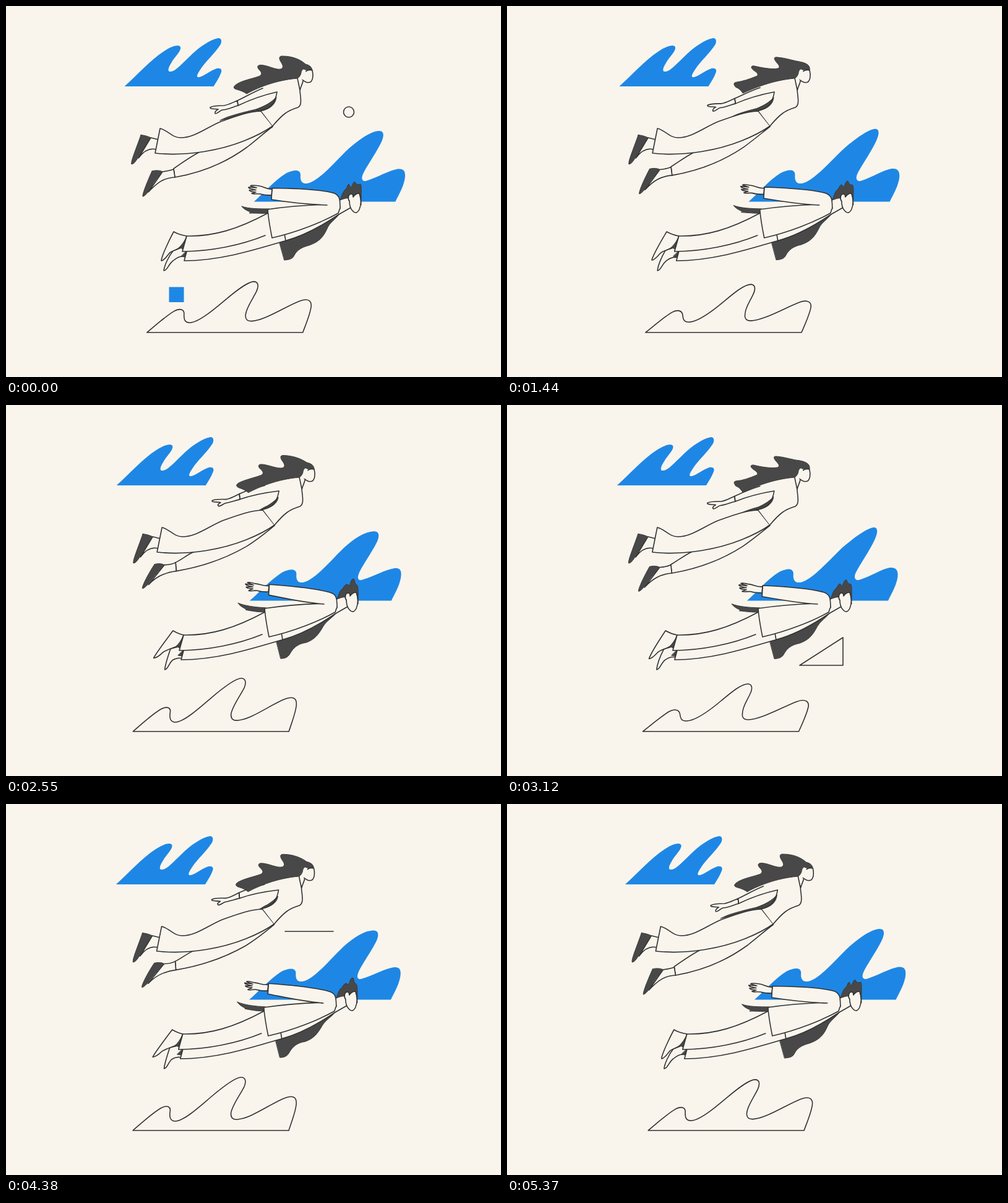
These frames come from a looping animation (800 by 600 pixels, 5.4 s). An HTML page:

```html
<!DOCTYPE html>
<html lang="en">
<head>
<meta charset="utf-8">
<title>Flying</title>
<style>
  html, body { margin: 0; width: 100%; height: 100%; overflow: hidden; background: #f9f5ed; }
  svg { display: block; width: 100vw; height: 100vh; }
  path, circle { stroke-linejoin: round; stroke-linecap: round; }
  .blue { fill: #1e87e5; }
  .dark { fill: #484848; stroke: #3a3a3a; stroke-width: 1; }
  .skin { fill: #f9f5ed; }
  .line { fill: none; stroke: #323232; stroke-width: 1.6; }
  .both { fill: #f9f5ed; stroke: #323232; stroke-width: 1.6; }
</style>
</head>
<body>
<svg viewBox="0 0 800 600"></svg>
<script>
const LOOP = 5400, CYCLE = 1800, STEP = 30;
const svg = document.querySelector('svg');
const parts = [];

function add(parent, tag, cls) {
  const node = document.createElementNS('http://www.w3.org/2000/svg', tag);
  if (cls) node.setAttribute('class', cls);
  parent.appendChild(node);
  return node;
}

// A part is a path; with a second pose it is blended by the named driver.
function part(group, cls, d, to, driver) {
  const node = add(group, 'path', cls);
  node.setAttribute('d', d);
  if (to) parts.push({ node, d, to, driver });
}

const NUM = /-?\d+(\.\d+)?/g;
function blend(a, b, k) {
  const ends = b.match(NUM);
  let i = 0;
  return a.replace(NUM, v => (+v + (ends[i++] - v) * k).toFixed(2));
}

// Value at time t along [time, value] keys.
function track(t, keys, ease = k => k) {
  if (t <= keys[0][0]) return keys[0][1];
  for (let i = 1; i < keys.length; i++) {
    const [t0, v0] = keys[i - 1], [t1, v1] = keys[i];
    if (t <= t1) return v0 + (v1 - v0) * ease((t - t0) / (t1 - t0));
  }
  return keys[keys.length - 1][1];
}
const soft = k => (1 - Math.cos(Math.PI * k)) / 2;
const wave = (t, peak = 0, period = CYCLE) => Math.cos((t - peak) / period * 2 * Math.PI);

const [topCloud, woman, bigCloud, man, lowCloud, flyers] =
  Array.from({ length: 6 }, () => add(svg, 'g'));

part(topCloud, 'blue', 'M191,130 C210,113 233,87 255,73 C270,63 283,61 281.5,69 C280,76 272,82 266,93 C261,101 260,107 266,106 C274,105 282,95 298,80 C316,62 336,52 344,52 C349,53 348,60 345,64 C338,75 322,90 314,102 C308,111 306,116 312,115 C320,113 330,104 340,101 C347,100 349,103 347,108 C344,116 340,122 335,130 Z');

part(bigCloud, 'blue',
  'M400,316.5 C415,304 433,283 452,271 C466,264 476,265 475.5,274 C475,282 477,288 486,287 C505,284 532,250 552,231 C570,215 586,205 600,204.5 C611,204 609,214 606,221 C598,238 580,262 576,274 C573,282 577,285 584,282 C600,277 620,266 634,264 C645,263 646,270 644,281 C641,295 634,306 629,316.5 Z',
  'M400,316.5 C415,304 433,281 452,270 C466,263 475,264 475,273 C474,282 477,288 486,287 C505,284 538,245 556,229 C574,214 594,199 605,198 C612,198 611,206 608,214 C600,234 580,261 575,273 C572,282 577,285 584,282 C600,277 618,265 631,263 C643,262 645,270 643,281 C640,295 633,306 628,316.5 Z', 'peak');

part(lowCloud, 'line',
  'M228,528 C242,516 258,501 273,492 C284,486 290,490 288,498 C287,506 288,513 297,513 C311,512 334,491 354,474 C374,457 394,442 403,442 C411,442 411,450 408,457 C401,471 388,488 386.5,500 C386,508 390,511 398,510 C420,508 453,483 475,475 C489,470 493,476 492,486 C491,498 484,515 480,528 Z',
  'M228,528 C242,517 257,504 270,496 C281,490 287,494 288,500 C289,508 291,511 298,511 C312,511 336,494 355,478 C373,463 386,452 398,451 C406,452 405,460 401,468 C396,479 389,488 389,499 C388,505 391,509 398,509 C420,508 453,489 476,480 C491,474 498,480 495,490 C492,502 486,515 480,528 Z', 'swell');

// Woman: far leg and foot
part(woman, 'both',
  'M431,195 C420,203 410,212 390,228 C360,250 320,269 273,277 L271,263 C285,253 300,243 313,236 L400,195 Z',
  'M431,195 C420,204 405,217 385,229 C355,246 320,260 272,268 L271,254 C280,250 288,243 297,239 L400,195 Z', 'swing');
part(woman, 'both',
  'M253,268 C260,267 266,266 271,264 L273,277 C255,278 245,285 230,301 Z',
  'M253,258 C260,258 266,257 271,254 L272,268 C255,270 240,276 227,290 Z', 'swing');
part(woman, 'dark',
  'M236,267 C242,265 250,266 253,268 C247,275 240,283 234,294 C229,302 224,308 221,308 C220,304 230,280 236,267 Z',
  'M237,257 C243,255 250,256 253,258 C246,265 238,274 231,283 C225,291 220,296 217,296 C216,292 228,270 237,257 Z', 'swing');

// Woman: far arm, near leg and foot
part(woman, 'dark',
  'M346,185 C350,183 354,181 358,179.5 C378,173 392,170 404,167 C418,162 429,156 437,148 C437,156 430,166 412,170 C390,172 370,180 346,185 Z',
  'M405,172 C407,171 409,170 412,168 C416,165 418,164 420,163 C426,159 432,155 437,149 C436,158 430,166 412,170 C410,171 408,171 405,172 Z', 'swing');
part(woman, 'both', 'M234,213 L246,216 L243,232 C232,229 222,235 214,246 Z');
part(woman, 'dark', 'M218,208.5 C224,209 230,211 234,213 C228,220 224,228 219,236 C213,245 209,255 203,256 C201,252 210,232 218,208.5 Z');
part(woman, 'both', 'M412,170 C390,171 372,178 347,187 C325,196 305,213 282,213 C268,213 262,201 249,198 L241,238 C295,244 350,232 385,218 C405,210 420,202 431,194 Z');

// Woman: torso, near arm, hand
part(woman, 'skin',
  'M471,117 C435,121 410,137 374,153 L375,161 C398,150 420,143 438,139 C437,150 432,160 412,169 L431,194 C447,175 455,169 472,164 C479,160 476,148 475,137 C476,130 480,125 480,121 Z',
  'M471,117 C435,121 410,128 374,143 L375,152 C398,144 420,141 438,139 C437,150 432,160 412,169 L431,194 C447,175 455,169 472,164 C479,160 476,148 475,137 C476,130 480,125 480,121 Z', 'swing');
part(woman, 'dark',
  'M404,168 C418,163 430,155 437,147 C436,157 430,166 412,170 Z',
  'M412,169 C420,164 430,157 437,149 C436,157 430,165 412,169 Z', 'swing');
part(woman, 'both',
  'M374,153 C366,156 360,160 352,161 C344,161 335,161 330,164 C329,167 337,166 343,167 C339,169 337,172 338,174 C343,174 345,169 350,168 C358,168 367,163 375,161 Z',
  'M374,143 C366,147 360,151 352,152 C344,152 335,151 330,154 C329,157 337,156 344,157 C340,159 338,161 341,163 C346,162 348,159 352,158 C358,157 367,154 375,152 Z', 'swing');
part(woman, 'line',
  'M412,169 C430,166 436,152 438,139 C420,143 398,150 375,161 L374,153 C385,148 400,139 415,133',
  'M412,169 C430,166 436,152 438,139 C420,141 398,144 375,152 L374,143 C385,138 400,133 415,130', 'swing');
part(woman, 'line', 'M480,121 C480,125 476,130 475,137 C476,148 479,160 472,164 C455,169 447,175 431,194 M471,117 L475,136');

// Woman: hair and face
part(woman, 'dark',
  'M495,104 C494,97 488,95 484,94 C474,85 461,81 446,81 C441,81 441,85 444,90 C448,96 449,100 444,102 C436,104 422,95 411,95.5 C405,96 406,100 410,104 C414,108 414,112 408,114 C396,118 380,121 372,127 C366,131 368,134 373,135 C380,137 385,139 389,142 C405,133 435,120 471,117 C477,114 476,106 482,103 Z',
  'M495,104 C497,96 490,92 480,90 C468,89 455,84 441,83 C436,83 437,86 441,91 C447,97 447,100 443,101 C434,103 416,100 404,97 C399,97 399,100 404,104 C412,109 413,112 408,114 C398,118 388,122 376,123 C371,124 374,128 376,131 C382,133 385,138 387,141 C405,133 435,120 471,117 C477,114 476,106 482,103 Z', 'hair');
part(woman, 'both', 'M484,106 C488,103 492,103 495,104 C497,112 496,120 492,123 C487,125 482,122 479,119');
part(woman, 'skin', 'M479,119 C476,113 477,103 481,102.5 C484,103 485,106 484,108 L488,120 Z');

// Man: feet and legs
part(man, 'both',
  'M270,396 C262,406 256,420 255,428 C261,428 262,418 270,412 C277,406 284,404 289,405 L292,397 L283,391 Z',
  'M271,394 C268,404 263,418 262,428 C267,428 268,419 274,413 C279,410 284,409 289,410 L292,397 L283,391 Z', 'swing');
part(man, 'dark', 'M291,397 L289,406 L283,405 Z');
part(man, 'both',
  'M271,365 C278,369 286,371 292,372 C290,380 286,386 282,390 C274,396 266,396 263,401 C259,406 255,412 251,412 C251,405 265,376 271,365 Z',
  'M275,365 C282,369 287,371 292,372 C288,382 284,389 279,391 C272,394 264,396 258,400 C254,404 247,409 243,409 C248,400 266,377 275,365 Z', 'swing');
part(man, 'dark', 'M292,373 L286,391 L278,392 C285,386 289,379 292,373 Z');
part(man, 'dark',
  'M381,324 C392,328 408,328 426,328 L424,335 C416,336 406,335 393,335 C400,333 386,332 381,324 Z',
  'M380,320 C392,325 408,327 426,328 L424,335 C416,335 406,334 392,331 C400,332 384,328 380,320 Z', 'swing');
part(man, 'dark',
  'M442,382 C475,375 510,355 539,336 C533,345 523,350 519,360 C512,376 504,382 490,387 C475,391 470,396 466,403 C463,410 457,410 450,411 Z',
  'M442,382 C475,375 510,355 539,336 C533,344 524,348 518,357 C510,371 504,379 490,384 C475,386 469,394 465,400 C461,408 456,410 449,410 Z', 'swing');
part(man, 'skin', 'M292,372 C335,373 375,361 423,335 L450,340 L538,333 L538,337 C510,356 480,372 452,379.5 C400,395 345,412 288,412 L292,397 L285,397 Z');
part(man, 'line', 'M423,335 C375,361 335,373 292,372 L285,397 C330,397 380,387 419,371 M292,397 L288,412 C345,412 400,395 452,379.5 C480,372 510,356 538,337 M450,368 L452,380');

// Man: head
part(man, 'skin', 'M540,313 L556,306 L562,325 L537,337 Z');
part(man, 'line', 'M540,313 L552,309 M538,337 L559,325');
part(man, 'dark',
  'M540,314 C543,305 545,300 548,297 C551,296 551,290 554,288 C556,290 556,294 558,293 C560,290 561,284 564,284.5 C566,288 567,290 573,288 C575,291 574,300 574,322 C572,318 572,308 570,304 L555,311 C550,310 545,312 540,314 Z',
  'M540,314 C543,305 545,299 549,297 C551,294 552,291 556,290 C559,291 559,293 561,290 C562,285 564,281 567,281 C569,284 568,289 572,291 C575,295 574,304 574,322 C572,318 572,308 570,304 L555,311 C550,310 545,312 540,314 Z', 'tuft');
part(man, 'both', 'M555,316 C552,312 553,304 558,304 C561,304 561,307 561,309 C563,306 566,303 571,303 C574,312 574,322 571,329 C568,335 564,336 560,331 C556,327 555,320 555,315');

// Man: jacket, arm, hand
part(man, 'skin', 'M423,329 C450,326 485,322 519,321 L540,326 L537,335 C510,350 470,366 430,375 Z');
part(man, 'line', 'M519,321 C485,322 450,325 423,329 C424,345 427,360 430,375 C470,366 510,350 537,335 L540,326');
const armDown = 'M519,322 C490,321 460,318 429,313 L430,294.5 C475,295 515,298 531,303 C540,307 540,315 540,328';
const armUp = 'M519,322 C490,320 460,313 429.5,307 L430.5,290 C470,293 510,298 528,303 C539,306 540,312 540,328';
part(man, 'skin', armDown, armUp, 'swing');
part(man, 'line', armDown, armUp, 'swing');
part(man, 'both',
  'M430,296 C421,297 417,292 409,291 C402,290 396,289 395,291 L405,294 L392,293 C391,295 400,297 404,297.5 L393,298 C394,300 401,301 404,301 L397,303 C398,305 406,303 411,304 C417,306 423,306 429,306 Z',
  'M430,292 C421,293 417,290 409,289 C402,288 396,285 395,287 L405,291 L392,289 C391,291 400,293 404,294 L393,294 C394,296 401,297 404,297 L397,300 C398,302 406,299 411,300 C417,302 423,302 429,302 Z', 'swing');

const ring = add(flyers, 'circle', 'line');
const shapes = add(flyers, 'path', 'line');
const square = add(flyers, 'path', 'blue');

// Straight dash sliding left, growing in and shrinking out around its full length.
function dash(t, at, y, x, length, from, to) {
  if (t < from || t > to) return '';
  const left = x - (t - at) * 0.35;
  const size = length * track(t, [[from, 0], [from + 150, 1], [to - 200, 1], [to, 0]]);
  return `M${left},${y} h${size}`;
}

function triangle(t) {
  if (t < 2910 || t > 4110) return '';
  const left = track(t, [[2910, 560], [3120, 473], [3810, 204], [3990, 159], [4110, 131]]);
  const width = track(t, [[2910, 0], [3060, 70], [3870, 70], [4110, 0]]);
  const height = track(t, [[2910, 0], [3120, 45], [3480, 45], [3810, 3], [3840, 0]], soft);
  return `M${left},421 h${width} v${-height} Z`;
}

function squarePath(t) {
  const local = t < 300 ? t + 3740 : t;
  const width = track(local, [[3390, 0], [3540, 24], [3740, 24], [3810, 12], [3870, 0]]);
  if (!width) return '';
  const mid = 275.5 - (local - 3740) * 0.39;
  return `M${mid - width / 2},454.5 h${width} v24.5 h${-width} Z`;
}

function draw(time) {
  const t = Math.floor(time % LOOP / STEP) * STEP;
  const p = t % CYCLE;
  const drive = {
    swing: (1 - wave(p)) / 2,
    hair: (1 - wave(p, 0, CYCLE / 2)) / 2,
    peak: track(p, [[0, 0.4], [250, 1], [825, 0], [1300, 1], [1785, 0.4]], soft),
    swell: track(p, [[0, 0.4], [825, 0], [1320, 1], [1770, 0.4]], soft),
    tuft: track(p, [[0, 0], [210, 0.9], [800, 1], [1320, 0.5], [1740, 0]], soft)
  };
  for (const { node, d, to, driver } of parts) node.setAttribute('d', blend(d, to, drive[driver]));

  const shift = (group, x) => group.setAttribute('transform', `translate(${x.toFixed(2)} 0)`);
  shift(topCloud, 9.4 * wave(p, 150) - 7.6);
  shift(woman, 6.2 * wave(p, 450));
  shift(bigCloud, 8.7 * wave(p, 255) - 4.8);
  shift(man, 12.3 * (wave(p, 315) - 0.454));
  shift(lowCloud, 11.7 * wave(p, -100) - 11.3);

  ring.setAttribute('cx', 554 - t * 292 / 870);
  ring.setAttribute('cy', 171.5);
  ring.setAttribute('r', 8.5 * track(t, [[930, 1], [1050, 0]]));
  ring.style.display = t < 1050 ? '' : 'none';
  shapes.setAttribute('d',
    triangle(t) + dash(t, 2010, 254, 331, 90, 1500, 2400) + dash(t, 4380, 206, 451, 78, 4200, 5040));
  square.setAttribute('d', squarePath(t));
}

let start;
function tick(now) {
  start ??= now;
  draw(Math.max(0, now - start));
  requestAnimationFrame(tick);
}
draw(0);
requestAnimationFrame(tick);
</script>
</body>
</html>
```
